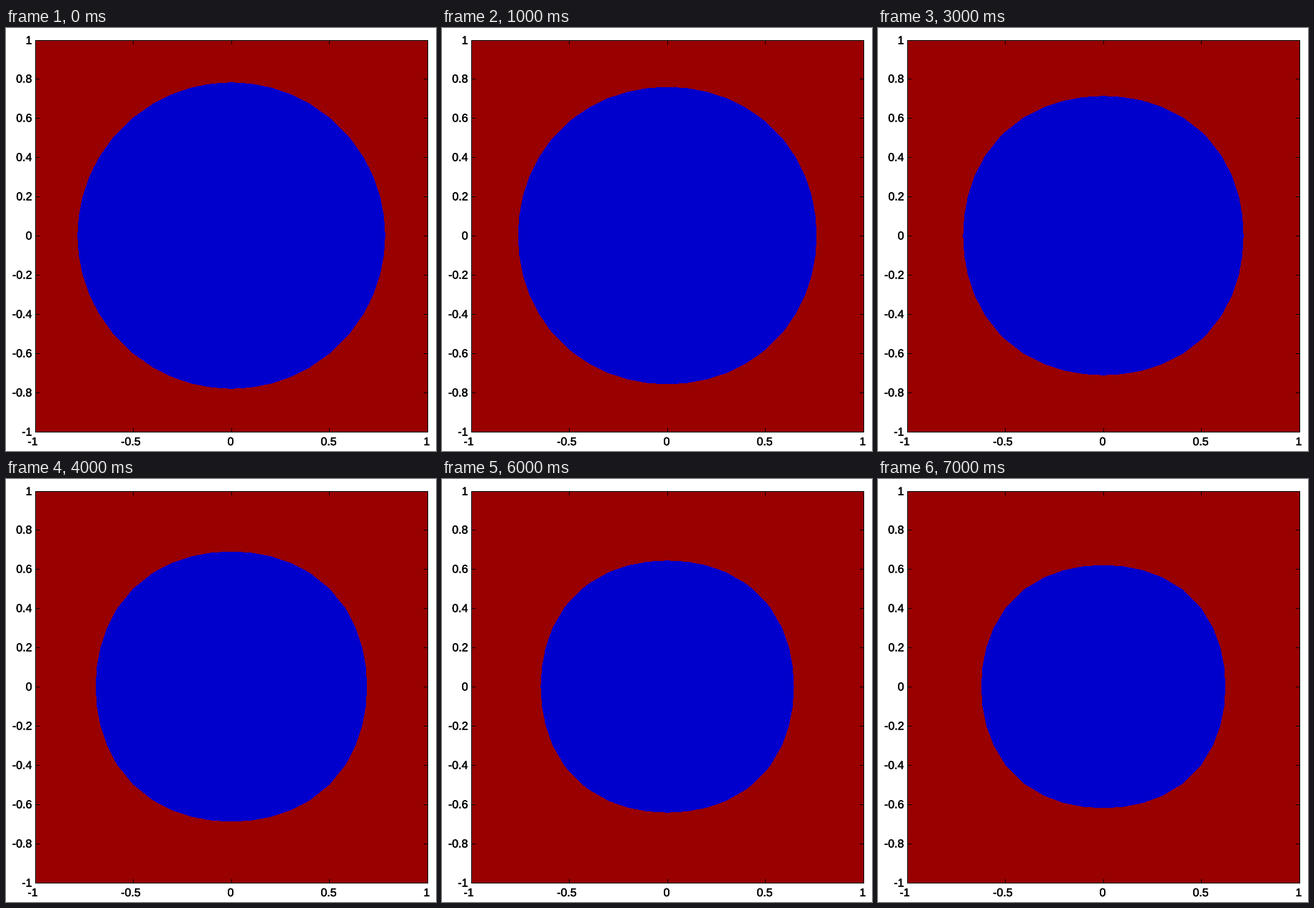
A matplotlib script that plays this animation: 603x593 px, repeating every 8 s.

```python
import numpy as np
import matplotlib.pyplot as plt
from matplotlib.animation import ArtistAnimation
from matplotlib.patheffects import withStroke

W, H, DPI = 603, 593, 64
LEFT, RIGHT, TOP, BOTTOM = 41, 591, 17, 566
PX = 72 / DPI  # one pixel in points
STEPS = 8

plt.rcParams["font.family"] = "Liberation Sans"
fig = plt.figure(figsize=(W / DPI, H / DPI), dpi=DPI, facecolor="white")
ax = fig.add_axes([0, 0, 1, 1])
ax.axis("off")


def to_x(v):
    return LEFT + (v + 1) / 2 * (RIGHT - LEFT)


def to_y(v):
    return BOTTOM - (v + 1) / 2 * (BOTTOM - TOP)


def line(x0, y0, x1, y1):
    """One-pixel black line through pixel centres."""
    ax.plot(np.floor([x0, x1]) + 0.5, np.floor([y0, y1]) + 0.5, color="black",
            lw=PX, antialiased=False, snap=False,
            solid_capstyle="projecting", zorder=3)


def label(x, y, value, ha):
    ax.text(x, y, f"{value:g}", ha=ha, va="baseline", fontsize=16 * PX,
            path_effects=[withStroke(linewidth=0.4 * PX, foreground="black")])


ax.add_patch(plt.Rectangle((LEFT, TOP), RIGHT - LEFT, BOTTOM - TOP,
                           color="#990000", lw=0, antialiased=False))

for x in (LEFT, RIGHT):
    line(x, TOP, x, BOTTOM)
for y in (TOP, BOTTOM):
    line(LEFT, y, RIGHT, y)

for k in range(-2, 3):
    v = k / 2
    x = to_x(v)
    line(x, BOTTOM, x, BOTTOM - 5)
    line(x, TOP, x, TOP + 5)
    label(x - (3.5 if v < 0 else 1), 585, v, "center")

for k in range(-5, 6):
    v = k / 5
    y = to_y(v)
    line(LEFT, y, LEFT + 5, y)
    line(RIGHT, y, RIGHT - 5, y)
    label(36.5, np.floor(y) + 5.5, v, "right")

# The shrinking region is contoured on a coarse grid, which gives its facets.
grid = np.linspace(-1, 1, 21)
gx, gy = np.meshgrid(grid, grid)
dist = np.hypot(gx, gy)
angle = np.arctan2(gy, gx)


def region(n):
    radius = 0.7829 - 0.02316 * n
    bulge = 0.019 * (1 - np.exp(-n / 1.8))
    level = dist - radius - bulge * np.sin(2 * angle) ** 2
    return ax.contourf(316 + 275 * gx, 291 - 273.7 * gy, level, levels=[-2, 0],
                       colors=["#0000cc"], antialiased=False, zorder=2)


frames = [[region(n)] for n in range(STEPS)]
ax.set_xlim(0, W)
ax.set_ylim(H, 0)

anim = ArtistAnimation(fig, frames, interval=1000, repeat=True, repeat_delay=0)
plt.show()
```
